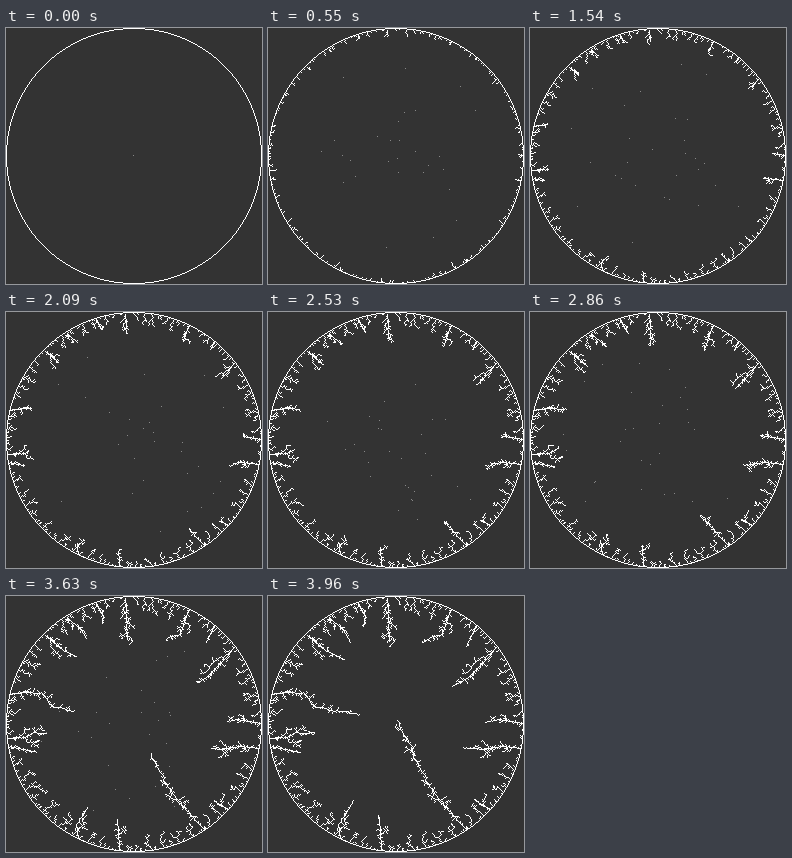
Recreate the animation shown at these times as an HTML page with a canvas. Size 256 by 256 pixels, loop 7.48 s.

```html
<!DOCTYPE html>
<html>
<head>
<meta charset="utf-8">
<style>
html, body { margin: 0; height: 100%; overflow: hidden; background: #333; }
canvas { display: block; width: 256px; height: 256px; image-rendering: pixelated; }
</style>
</head>
<body>
<canvas width="256" height="256"></canvas>
<script>
const SIZE = 256, MID = 127.5, STEPS = 36, STEP_MS = 110, LOOP_MS = 7480, EMPTY = 255;
const ctx = document.querySelector('canvas').getContext('2d');

const seeded = seed => () => {
  seed = (seed + 0x6D2B79F5) | 0;
  let v = Math.imul(seed ^ (seed >>> 15), 1 | seed);
  v = (v + Math.imul(v ^ (v >>> 7), 61 | v)) ^ v;
  return ((v ^ (v >>> 14)) >>> 0) / 4294967296;
};
const rand = seeded(11);
const jump = () => Math.floor(rand() * 3) - 1;

// Tip positions of the main branches, at all knots or evenly chosen ones
const KNOTS = [0, 14, 26, 30, STEPS];
const BRANCHES = [
  [2,98, 17,96, 36,97, 45,110, 91,118],
  [1,142, 18,141, 28,136, 34,137, 46,136],
  [119,1, 120,13, 120,33, 121,40, 121,45],
  [183,13, 179,22, 174,38, 165,40, 154,46],
  [228,50, 222,59, 205,76, 198,82, 184,90],
  [254,152, 233,150, 219,152, 215,153, 195,151],
  [198,233, 191,226, 171,203, 161,189, 129,124],
  [255,127, 230,123, 217,126],
  [222,213, 211,207, 206,203],
  [72,242, 70,228, 85,204],
  [113,254, 112,233, 110,219],
  [38,38, 57,54, 76,63],
  [60,21, 75,33, 82,46],
  [90,7, 97,20, 95,30],
  [208,29, 204,38, 198,50],
  [3,150, 32,156]
].map(p => ({ p, x: p[0], y: p[1] }));

const cells = () => new Uint8Array(SIZE * SIZE);
const born = cells().fill(EMPTY), sticky = cells(), fertile = cells();
const radius = (x, y) => Math.hypot(x - MID, y - MID);
let clear = 126;   // radius of the empty disc in the middle

function mark(mask, x, y, r) {
  for (let v = -r; v <= r; v++)
    for (let u = -r; u <= r; u++) mask[(y + v) * SIZE + x + u] = 1;
}

function plant(x, y, step) {
  const i = y * SIZE + x;
  if (born[i] === EMPTY) born[i] = step;
  mark(sticky, x, y, 1);
  clear = Math.min(clear, radius(x, y));
}

function tipAt({ p }, step) {
  const last = p.length / 2 - 1, knot = i => KNOTS[i * 4 / last];
  let i = 0;
  while (i < last - 1 && knot(i + 1) < step) i++;
  const f = (step - knot(i)) / (knot(i + 1) - knot(i));
  const mix = c => Math.round(p[2 * i + c] + (p[2 * i + 2 + c] - p[2 * i + c]) * f);
  return [mix(0), mix(1)];
}

function extend(branch, step) {
  const [tx, ty] = tipAt(branch, step);
  while (branch.x !== tx || branch.y !== ty) {
    const dx = tx - branch.x, dy = ty - branch.y;
    const far = Math.max(Math.abs(dx), Math.abs(dy));
    const stray = rand() < 0.22;
    const move = d => stray ? jump() : rand() < Math.abs(d) / far ? Math.sign(d) : 0;
    branch.x += move(dx);
    branch.y += move(dy);
    if (radius(branch.x, branch.y) > 127) continue;
    plant(branch.x, branch.y, step);
    mark(fertile, branch.x, branch.y, 7);
  }
}

// A random walker leaves the empty disc and sticks where it first touches
function walk(step) {
  const a = rand() * 2 * Math.PI, r = Math.max(0, clear - 3);
  let x = Math.round(MID + r * Math.cos(a)), y = Math.round(MID + r * Math.sin(a));
  while (!sticky[y * SIZE + x]) {
    x += jump();
    y += jump();
    if (x < 1 || y < 1 || x > 254 || y > 254) return;
  }
  const depth = 127 - radius(x, y);
  if (depth < 5 + 0.4 * step || fertile[y * SIZE + x]) plant(x, y, step);
}

for (let i = -90.5; i <= 90.5; i++) {
  const j = Math.round(Math.sqrt(MID * MID - i * i) - 0.5) + 0.5;
  for (const s of [-j, j]) {
    plant(MID + i, MID + s, 0);
    plant(MID + s, MID + i, 0);
  }
}
for (let step = 1; step <= STEPS; step++) {
  for (let n = 0; n < 65; n++) walk(step);
  BRANCHES.forEach(b => extend(b, step));
}

function draw(step) {
  ctx.fillStyle = '#333';
  ctx.fillRect(0, 0, SIZE, SIZE);
  ctx.fillStyle = '#888';
  if (step === 0) ctx.fillRect(127, 127, 1, 1);
  else if (step < STEPS) {
    const r = seeded(step * 977);
    for (let n = 0; n < 28; n++) {
      const a = r() * 2 * Math.PI, d = Math.min(95, 45 * Math.sqrt(-2 * Math.log(1 - r())));
      ctx.fillRect(Math.round(128 + d * Math.cos(a)), Math.round(128 + d * Math.sin(a)), 1, 1);
    }
  }
  ctx.fillStyle = '#fff';
  born.forEach((b, i) => {
    if (b <= step) ctx.fillRect(i % SIZE, Math.floor(i / SIZE), 1, 1);
  });
}

let shown = -1;
function tick() {
  const step = Math.min(STEPS, Math.floor(performance.now() % LOOP_MS / STEP_MS));
  if (step !== shown) draw(shown = step);
  requestAnimationFrame(tick);
}
tick();
</script>
</body>
</html>
```
